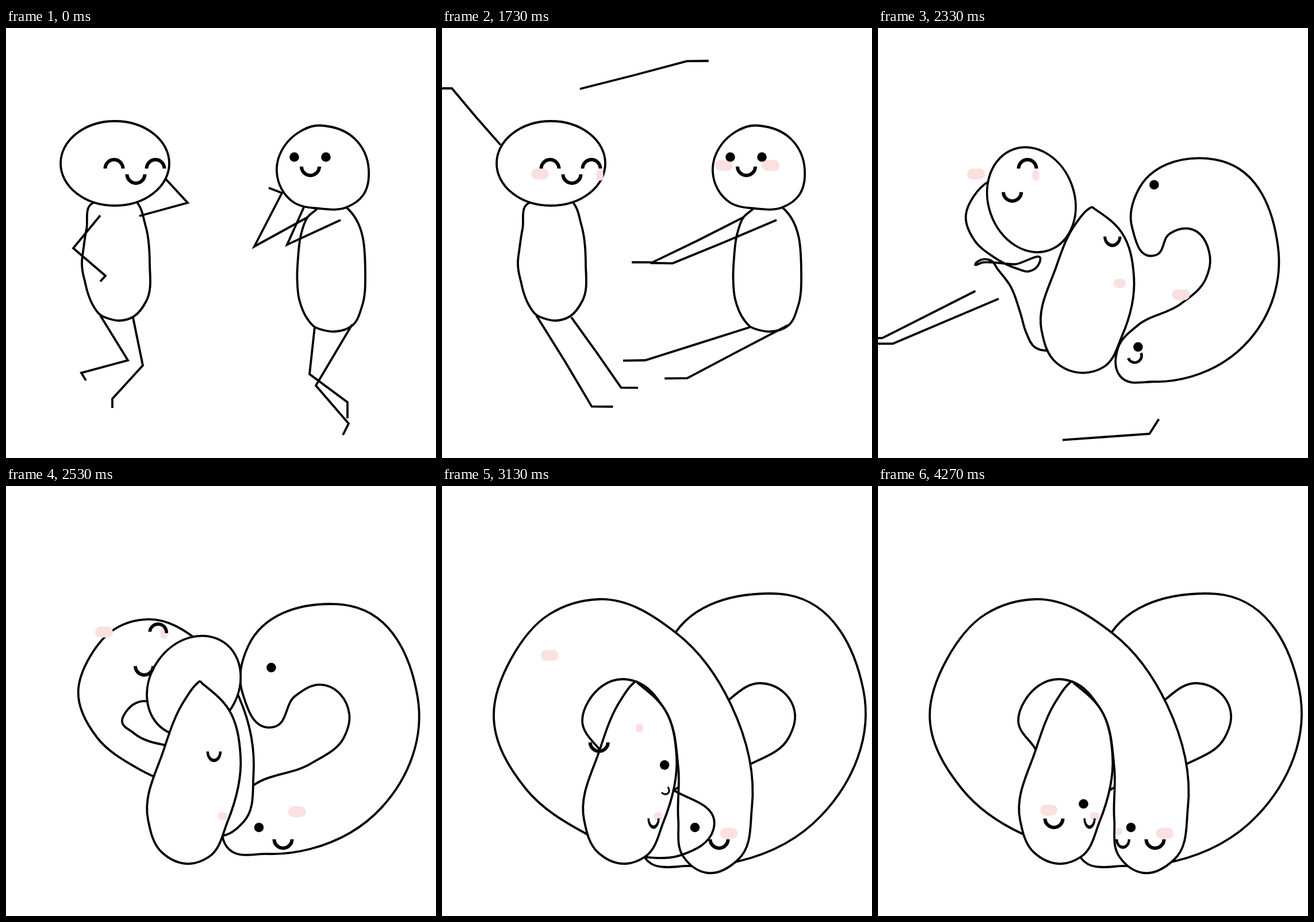
These frames come from a looping animation (748 px wide and 748 px high, 5990 ms). An HTML page with a canvas:

```html
<!DOCTYPE html>
<html lang="en">
<head>
<meta charset="utf-8">
<title>Two friends become a heart</title>
<style>
  html, body { margin: 0; width: 100%; height: 100%; overflow: hidden; background: #fff; }
  canvas { display: block; width: 100vw; height: 100vh; }
</style>
</head>
<body>
<canvas id="stage" width="748" height="748"></canvas>
<script>
const ctx = document.getElementById('stage').getContext('2d');
const LOOP = 5990, INK = '#000', BLUSH = '#fbe0e0';

const lerp = (a, b, u) => a + (b - a) * u;
const mix = (a, b, u) => a.map((v, i) => lerp(v, b[i], u));
const nums = s => s.trim().split(/[\s,]+/).map(Number);

// Progress through a time span: steady, eased at both ends, or slowing down.
const span = (t, start, dur) => Math.min(1, Math.max(0, (t - start) / dur));
const ease = (t, start, dur) => {
  const u = span(t, start, dur);
  return u < 0.5 ? 2 * u * u : 1 - 2 * (1 - u) ** 2;
};
const slow = (t, start, dur) => Math.sin(span(t, start, dur) * Math.PI / 2);

// Each outline point of a figure has its partner in the heart.
const leftStand = nums(`132,410 135,382 140,350 155,303 163,302 170,297 175,292 180,290 185,289 190,289
  197,289 205,290 222,298 243,345 250,410 244,475 222,502 197,509 180,506 164,499 150,480 142,460 137,440 133,422`);
const heart = tip => nums(`244,408 274,458 ${tip} 251,605 146,527 90,398 120,301 187,223 273,197 409,257 503,381
  539,560 515,650 461,673 420,645 411,580 411,490 387,388 337,340 314,336 255,374`);
const leftHeart = heart('430,530 526,615 455,660 380,655');
const leftTucked = heart('300,510 320,550 310,590 290,620');

const rightStand = nums(`537,520 525,507 510,472 506.5,435 508,400 513,360 524,330 545,310 550,300 560,300
  580,303 592,312 625,430 619,485 603,517 571,528 550,525`);
const rightHeart = nums(`355,575 413,523 534,485 603,438 614,397 554,343 499,372 450,440 385,370 395,275
  567,187 602,189.5 733,355 660,573 515,653 433,661 353,647`);

const headStand = nums('471,250 486,203 510,181 538,170 546,169.5 553,170 607,193 631,247 621,291 592,312 545,314 500,303');
const headHeart = nums('247,580 274,460 311,372 333,343 337,340 342,344 387,388 408,470 385,585 353,645 320,657 272,638');

// rest: standing pose; step: stretched segment; fly: x, y and degrees of the way out.
const limbs = [
  { rest: '164,326 117,383 173,431 164,441', lowered: '164,326 117,383 136,433 122,437',
    joint: [100, 200], step: [-43, -52], fly: [-1580, -1390, 0] },
  { rest: '232,327 316,304 280,265 268,250', joint: [240, 100], step: [95, -24], fly: [40, -653, 0] },
  { rest: '164,500 212,578 131,600 139,613', joint: [164, 500], step: [50, 80], fly: [2010, 1820, 0] },
  { rest: '221,504 238,587 185,645 185,661', joint: [225, 503], step: [45, 61], fly: [400, 890, -240],
    start: 1950, dur: 1100 },
  { rest: '525,329 432,380 480,287 457,278', joint: [525, 329], step: [-81, 41], fly: [-908, 328, 0] },
  { rest: '582,334 489,377 518,312 528,290', joint: [582, 334], step: [-92, 39], fly: [-950, 350, 0] },
  { rest: '537,520 528,602 594,651 594,679', joint: [537, 520], step: [-95, 28], fly: [0, 1485, 0] },
  { rest: '602,516 539,622 596,688 586,708', joint: [602, 517], step: [-90, 45], fly: [0, 2400, 0] }
];

// Every face part makes one trip: from, to, start, duration.
const eyes = [
  { from: [188, 244.5], to: [482, 614.5], start: 1950, dur: 505, size: [1, 1] },
  { from: [260, 244.5], to: [426, 614.5], start: 2400, dur: 1110, size: [0.7, 0.9] }
];
const mouths = [
  { from: [226, 254.5], to: [306, 578.5], start: 1800, dur: 2430, size: [1, 1], bow: 0 },
  { from: [529.5, 241], to: [368, 578], start: 1800, dur: 1250, size: [0.57, 1], bow: -70 }
];
const dots = [
  { from: [501.5, 224.5], to: [357.5, 553], start: 1800, dur: 1960 },
  { from: [556.5, 224.5], to: [440, 594], start: 1800, dur: 690 }
];
const cheeks = [
  { from: [170.5, 254, 31, 19], to: [297, 564, 30, 19], start: 2760, dur: 1450, tint: 0.75 },
  { from: [274.5, 256, 12, 19], to: [419, 601, 12, 13], start: 2520, dur: 1250, tint: 0.75 },
  { from: [490.5, 239, 31, 19], to: [376.5, 574, 16, 14], start: 2070, dur: 466, tint: 1 },
  { from: [571.5, 239, 31, 19], to: [499, 604, 31, 19], start: 1800, dur: 945, tint: 1 }
];

// Closed curve; at each point it follows the circle through the two neighbours.
function blob(v) {
  const n = v.length / 2;
  const p = i => [v[(i + n) % n * 2], v[(i + n) % n * 2 + 1]];
  const tangent = i => {
    const [ax, ay] = p(i - 1), [x, y] = p(i), [bx, by] = p(i + 1);
    const d = (x - ax) ** 2 + (y - ay) ** 2 || 1, e = (bx - x) ** 2 + (by - y) ** 2 || 1;
    const tx = (x - ax) / d + (bx - x) / e, ty = (y - ay) / d + (by - y) / e;
    const len = Math.hypot(tx, ty) || 1;
    return [tx / len, ty / len];
  };
  ctx.beginPath();
  ctx.moveTo(...p(0));
  for (let i = 0; i < n; i++) {
    const [ax, ay] = p(i), [bx, by] = p(i + 1), dx = bx - ax, dy = by - ay;
    const [sx, sy] = tangent(i), [ex, ey] = tangent(i + 1);
    const len = Math.hypot(dx, dy) || 1;
    const reach = (x, y) => 2 * len / 3 / (1 + Math.max(0, (x * dx + y * dy) / len));
    const h = reach(sx, sy), k = reach(ex, ey);
    ctx.bezierCurveTo(ax + sx * h, ay + sy * h, bx - ex * k, by - ey * k, bx, by);
  }
  ctx.closePath();
  ctx.fill();
  ctx.stroke();
}

function drawLimb({ rest, lowered = rest, joint: [x, y], step: [dx, dy], fly, start = 1800, dur = 1200 }, t) {
  const toe = Math.sign(dx) * Math.hypot(dx, dy) * 0.4;
  const straight = [x, y, x + dx, y + dy, x + 2 * dx, y + 2 * dy, x + 2 * dx + toe, y + 2 * dy];
  const stand = mix(nums(rest), nums(lowered), ease(t, 600, 600));
  const v = mix(stand, straight, ease(t, 1200, 600));
  const q = ease(t, start, dur);
  ctx.save();
  ctx.translate(v[0] + fly[0] * q, v[1] + fly[1] * q);
  ctx.rotate(fly[2] * q * Math.PI / 180);
  ctx.beginPath();
  for (let i = 0; i < 8; i += 2) ctx.lineTo(v[i] - v[0], v[i + 1] - v[1]);
  ctx.stroke();
  ctx.restore();
}

function drawHead(t) {
  const q = ease(t, 1800, 1200);
  ctx.globalAlpha = 1 - span(t, 2600, 400);
  ctx.beginPath();
  ctx.ellipse(lerp(189.5, 387, q), lerp(235.5, 397, q), lerp(94.5, 91, q), lerp(73.5, 77, q), Math.PI * q, 0, 7);
  ctx.fill();
  ctx.stroke();
  ctx.globalAlpha = 1;
}

function arc(x, y, angle, sx, sy) {
  ctx.save();
  ctx.translate(x, y);
  ctx.rotate(angle);
  ctx.scale(sx, sy);
  ctx.beginPath();
  ctx.arc(0, 0, 15.5, Math.PI, 0);
  ctx.stroke();
  ctx.restore();
}

function drawFace(t) {
  const trip = s => ease(t, s.start, s.dur);

  ctx.fillStyle = BLUSH;
  for (const s of cheeks) {
    const [x, y, w, h] = mix(s.from, s.to, trip(s));
    ctx.globalAlpha = lerp(s.tint * span(t, 600, 600), 1, span(t, 1200, 300));
    ctx.beginPath();
    ctx.roundRect(x - w / 2, y - h / 2, w, h, Math.min(w / 2, 9.5));
    if (t > 600) ctx.fill();
  }
  ctx.globalAlpha = 1;

  ctx.lineWidth = 6;
  // Eyes shrink while they turn over.
  for (const s of eyes) {
    const p = trip(s), [x, y] = mix(s.from, s.to, p), [w, h] = mix([1, 1], s.size, p);
    const dip = 1 - 0.6 * Math.sin(Math.PI * p);
    arc(x, y, Math.PI * p, w * dip, h * dip);
  }
  for (const s of mouths) {
    const p = trip(s), [x, y] = mix(s.from, s.to, p), [w, h] = mix([1, 1], s.size, p);
    arc(x + s.bow * Math.sin(Math.PI * p), y, Math.PI, w, h);
  }

  ctx.fillStyle = INK;
  for (const s of dots) {
    const [x, y] = mix(s.from, s.to, trip(s));
    ctx.beginPath();
    ctx.arc(x, y, 8.3, 0, 7);
    ctx.fill();
  }
}

function draw(t) {
  ctx.fillStyle = '#fff';
  ctx.fillRect(0, 0, 748, 748);
  ctx.strokeStyle = INK;
  ctx.lineWidth = 3.8;

  const leftEnd = mix(leftHeart, leftTucked, ease(t, 2950, 500));
  blob(mix(rightStand, rightHeart, slow(t, 1830, 1100)));
  blob(mix(leftStand, leftEnd, ease(t, 1800, 1290)));
  limbs.forEach(l => drawLimb(l, t));
  if (t < 3000) drawHead(t);
  blob(mix(headStand, headHeart, ease(t, 1890, 620)));
  drawFace(t);
}

const start = performance.now();
function tick() {
  draw((performance.now() - start) % LOOP);
  requestAnimationFrame(tick);
}
tick();
</script>
</body>
</html>
```
